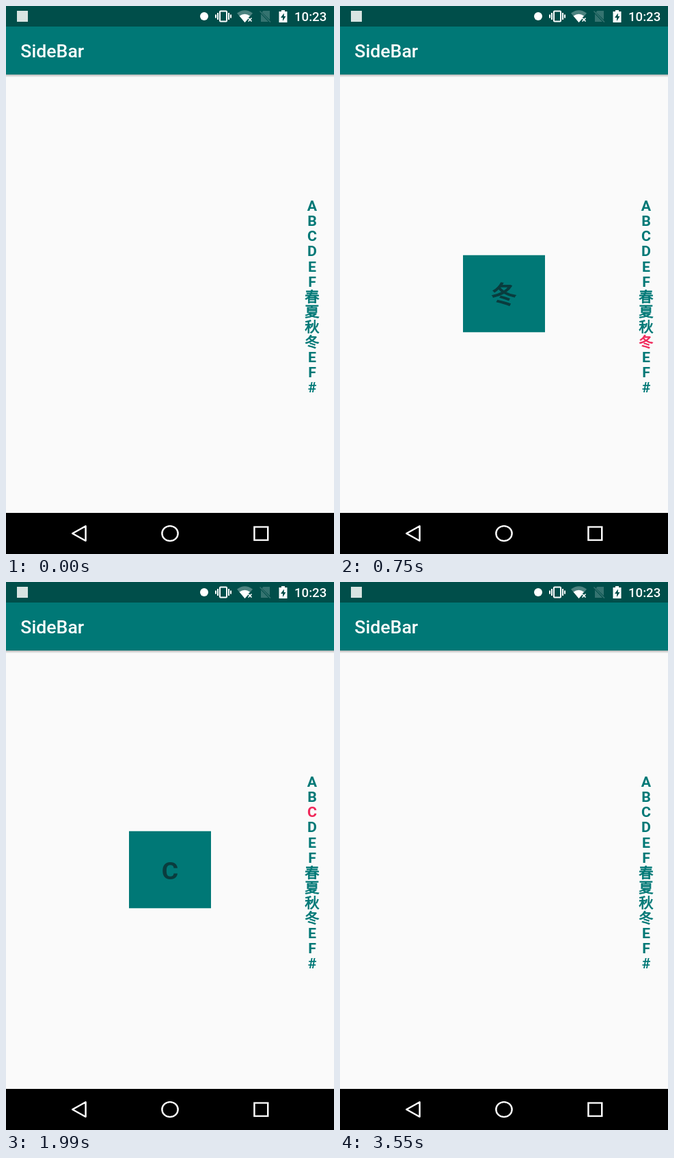
Animation, 480 px wide and 800 px high, one loop 3610 ms. Source, as an HTML page:

```html
<!DOCTYPE html>
<html lang="zh-CN">
<head>
<meta charset="utf-8">
<title>SideBar</title>
<style>
  html, body { margin: 0; width: 100%; height: 100%; overflow: hidden; background: #000; }
  svg { display: block; width: 100vw; height: 100vh; }
  text { font-family: Roboto, "Noto Sans CJK SC", "Noto Sans CJK", sans-serif; }
  .label { font-weight: 700; text-anchor: middle; }
  #index .label { font-size: 20px; }
  #big { font-size: 35px; }
  /* regular Han glyphs with an outline, as a synthetic bold */
  .label.han { font-weight: 400; stroke: currentColor; stroke-width: .038em; }
</style>
</head>
<body>
<!-- The screen is 450 units wide, shown slightly widened -->
<svg viewBox="0 0 450 800" preserveAspectRatio="none" xmlns="http://www.w3.org/2000/svg">
  <defs>
    <linearGradient id="shade" x1="0" y1="0" x2="0" y2="1">
      <stop offset="0" stop-opacity=".28"/>
      <stop offset="1" stop-opacity="0"/>
    </linearGradient>
  </defs>

  <rect y="100" width="450" height="640" fill="#fafafa"/>
  <rect y="100" width="450" height="4" fill="url(#shade)"/>
  <rect y="29" width="450" height="71" fill="#007876"/>
  <rect width="450" height="30" fill="#004e4a"/>
  <text x="20" y="75" font-size="25" font-weight="500" fill="#fff">SideBar</text>
  <text x="440" y="21.7" font-size="17.5" font-weight="500" text-anchor="end" fill="#fff">10:23</text>

  <g transform="scale(.9375 1)" fill="#fff">
    <rect x="16" y="7" width="16" height="16" fill="#d8e4e2"/>
    <circle cx="290" cy="15" r="6"/>
    <g fill="none" stroke="#fff" stroke-width="2">
      <rect x="313" y="7.5" width="10" height="15" rx="1"/>
      <path d="M310 10v10M307 12.5v5M326 10v10M329 12.5v5"/>
    </g>
    <path d="M338 10.5Q349.500 2 361 10.5L349.500 24Z" fill="#4d8380"/>
    <path d="M341.500 14.500Q349.500 9 357 14.500L354 17.500V19L349.500 24Z"/>
    <path d="M354.500 17.500l5 5m0-5l-5 5" stroke="#fff" stroke-width="1.700"/>
    <g fill="#357370">
      <path d="M376.500 7H386V20L374.500 9ZM373 11.500L384 23H373Z"/>
      <path d="M371.500 7.500L387 23.500" stroke="#357370" stroke-width="1.600"/>
    </g>
    <path d="M403 6h5v2h3.500v16h-12V8h3.500Z"/>
    <path d="M406.800 10.500L402 17h3v5l4.500-7h-2.700Z" fill="#004e4a"/>
  </g>

  <g id="index"></g>

  <g id="card">
    <rect x="168.750" y="363.750" width="112.500" height="112.500" fill="#007876"/>
    <text id="big" x="225" y="433.800"></text>
  </g>

  <rect y="740" width="450" height="60"/>
  <g fill="none" stroke="#fff" stroke-width="2.300">
    <path d="M91.200 770L109.300 759.300V780.700Z" stroke-linejoin="round"/>
    <circle cx="225" cy="770" r="10.900"/>
    <rect x="340.700" y="760.500" width="18.600" height="19.200"/>
  </g>
</svg>
<script>
const LOOP = 3610;
const LABELS = [..."ABCDEF春夏秋冬EF#"];
const TEAL = "#007876", PICKED = "#f0285a", DARK = "#0a3c3e";

// Finger strokes: first change, last change, entries passed (-1: finger lifted)
const STROKES = [
  [120, 560, [1, 2, 3, 4, 5, 6, 7, 8]],
  [750, 750, [9]],
  [870, 930, [10, 11]],
  [1310, 1740, [10, 9, 8, 7, 6, 5, 4, 3]],
  [1990, 2490, [2, 1, 1, 2, 3, 4, 5, 7, 8]],
  [2550, 3050, [10, 11, 10, 9, 7, 5, 3, 2, 1]],
  [3120, 3120, [2]],
  [3300, 3550, [4, 6, 7, 9, -1]]
];

const $ = id => document.getElementById(id);

function setLabel(el, label) {
  el.textContent = label;
  el.setAttribute("class", label > "\u2fff" ? "label han" : "label");
}

function paint(el, color) {
  el.setAttribute("fill", color);
  el.setAttribute("color", color);
}

const items = LABELS.map((label, i) => {
  const el = document.createElementNS("http://www.w3.org/2000/svg", "text");
  el.setAttribute("x", 420);
  el.setAttribute("y", 299.2 + i * 22.08);
  setLabel(el, label);
  $("index").append(el);
  return el;
});
paint($("big"), DARK);

function selectedAt(t) {
  const stroke = STROKES.filter(s => s[0] <= t).pop();
  if (!stroke) return -1;
  const [start, end, path] = stroke;
  const last = path.length - 1;
  const step = last ? (end - start) / last : 1;
  return path[Math.min(last, Math.floor((t - start + 3) / step))];
}

function draw(t) {
  const sel = selectedAt(t);
  items.forEach((el, i) => paint(el, i === sel ? PICKED : TEAL));
  $("card").setAttribute("visibility", sel < 0 ? "hidden" : "visible");
  setLabel($("big"), LABELS[sel] || "");
}

function tick() {
  draw(performance.now() % LOOP);
  requestAnimationFrame(tick);
}
tick();
</script>
</body>
</html>
```
